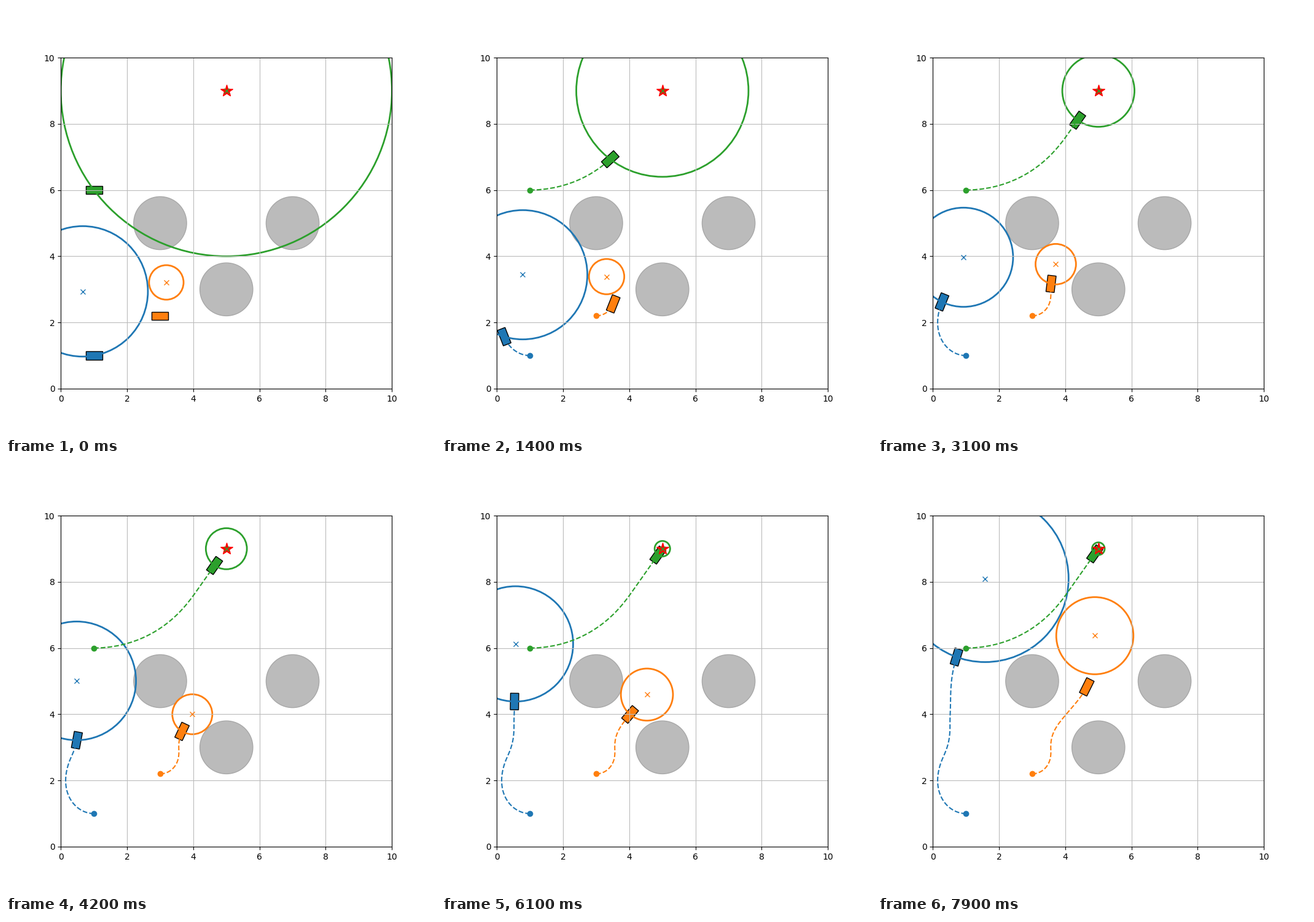
These frames come from a looping animation (700x700 px, 8000 ms). A matplotlib script:

```python
import numpy as np
import matplotlib.pyplot as plt
from matplotlib.animation import FuncAnimation
from matplotlib.patches import Circle, Polygon

STEPS = 80
TURN = 0.083        # turn per step for one radian of heading error
STOP = 0.2          # a vehicle this close to its aim stays put
GAP = 0.05          # spacing kept between neighbouring regions
GOAL = (5, 9)
OBSTACLES = [(3, 5), (7, 5), (5, 3)]
BODY = np.array([(-.25, -.125), (.25, -.125), (.25, .125), (-.25, .125)])


def glide(knots):
    """Smooth path through (step, x, y) key points."""
    a = np.array(knots, float)
    t, p = a[:, 0], a[:, 1:]
    v = np.gradient(p, t, axis=0)
    k = np.arange(STEPS)
    i = np.clip(np.searchsorted(t, k, side="right") - 1, 0, len(t) - 2)
    h = (t[i + 1] - t[i])[:, None]
    s = (k - t[i])[:, None] / h
    return ((1 + 2*s) * (1 - s)**2 * p[i] + s * (1 - s)**2 * h * v[i]
            + s**2 * (3 - 2*s) * p[i + 1] - s**2 * (1 - s) * h * v[i + 1])


def pursue(start, heading, aim, gain):
    """Speed follows the distance to the aim, turning the root of the error."""
    x, y = start
    states, reach = [], []
    for ax_, ay in aim:
        d = np.hypot(ax_ - x, ay - y)
        states.append((x, y, heading))
        reach.append(d)
        if d < STOP:
            continue
        error = np.arctan2(ay - y, ax_ - x) - heading
        error = (error + np.pi) % (2 * np.pi) - np.pi
        turn = TURN * np.sign(error) * np.sqrt(abs(error))
        mid = heading + turn / 2
        x += gain * d * np.cos(mid)
        y += gain * d * np.sin(mid)
        heading += turn
    return np.array(states), np.array(reach)


blue_aim = glide([
    (0, .66, 2.94), (8, .812, 3.21), (21, .72, 3.715), (34, .9, 4.15),
    (42, .478, 5.009), (53, .58, 5.505), (65, .63, 6.5), (79, 1.578, 8.098)])
orange_aim = glide([
    (0, 3.186, 3.21), (8, 3.205, 3.265), (21, 3.492, 3.56), (42, 3.971, 4.0),
    (53, 4.262, 4.304), (63, 4.633, 4.712), (69, 5.033, 5.213),
    (75, 5.135, 5.77), (79, 4.893, 6.373)])
green_aim = np.tile(GOAL, (STEPS, 1))

blue, blue_r = pursue((1, 1), np.pi, blue_aim, 0.0365)
orange, orange_r = pursue((3, 2.2), 0, orange_aim, 0.05)
green, green_r = pursue((1, 6), 0, green_aim, 0.05)

# The orange region must not touch the blue one
spacing = np.hypot(*(orange_aim - blue_aim).T)
orange_r = np.minimum(orange_r, spacing - blue_r - GAP)

fig, ax = plt.subplots(figsize=(7, 7), dpi=100)
ax.set_aspect("equal")
ax.set_xlim(0, 10)
ax.set_ylim(0, 10)
ax.grid(True, color="#bbbbbb")
for c in OBSTACLES:
    ax.add_patch(Circle(c, 0.8, facecolor="#bbbbbb", edgecolor="#a8a8a8"))
ax.plot(*GOAL, "r*", markersize=15)


class Agent:
    def __init__(self, color, states, aim, radius):
        self.pos, self.heading = states[:, :2], states[:, 2]
        self.aim, self.radius = aim, radius
        self.body = ax.add_patch(
            Polygon(BODY, facecolor=color, edgecolor="black"))
        self.ring = ax.add_patch(
            Circle(aim[0], radius[0], fill=False, edgecolor=color, linewidth=2))
        self.trail, = ax.plot([], [], "--", color=color)
        self.start, = ax.plot([], [], "o", color=color)
        self.cross, = ax.plot([], [], "x", color=color)

    def show(self, i):
        c, s = np.cos(self.heading[i]), np.sin(self.heading[i])
        self.body.set_xy(BODY @ np.array([(c, s), (-s, c)]) + self.pos[i])
        self.ring.set_center(self.aim[i])
        self.ring.set_radius(self.radius[i])
        self.cross.set_data(*self.aim[i:i + 1].T)
        path = self.pos[:i + 1] if i else self.pos[:0]
        self.trail.set_data(*path.T)
        self.start.set_data(*path[:1].T)
        return self.body, self.ring, self.trail, self.start, self.cross


agents = [
    Agent("tab:blue", blue, blue_aim, blue_r),
    Agent("tab:orange", orange, orange_aim, orange_r),
    Agent("tab:green", green, green_aim, green_r),
]


def update(i):
    return [artist for agent in agents for artist in agent.show(i)]


anim = FuncAnimation(fig, update, frames=STEPS, interval=100,
                     repeat=True, repeat_delay=0)
plt.show()
```
